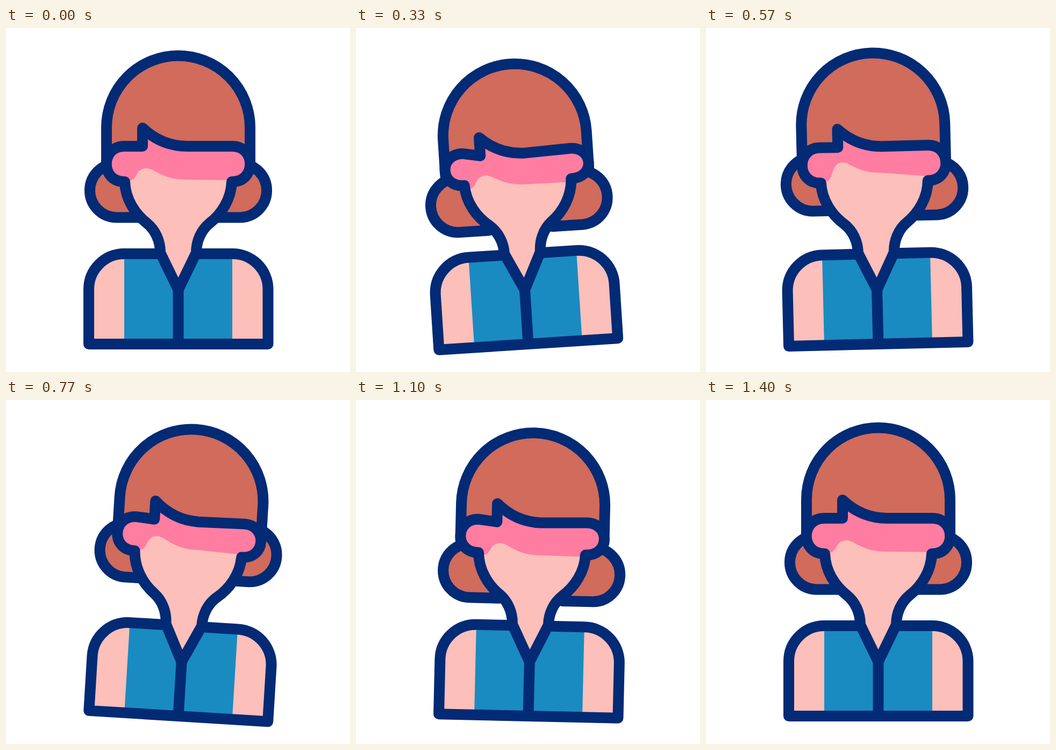
Animation, 640 px wide and 640 px high, one loop 2.17 s. Source, as an HTML page:

```html
<!DOCTYPE html>
<html lang="en">
<head>
<meta charset="utf-8">
<style>
  html, body { margin: 0; height: 100%; overflow: hidden; background: #fff; }
  svg { display: block; width: 100%; height: 100%; }
  .line { stroke: #032a75; stroke-width: 20; stroke-linecap: round; stroke-linejoin: round; }
  .none { fill: none; }
  .hair { fill: #d16b5b; }
  .skin { fill: #fcbfba; }
  .pink { fill: #ff7da1; }
  .blue { fill: #198bc1; }
</style>
</head>
<body>
<svg viewBox="0 0 640 640">
  <g id="person">
    <path id="bunLeft" class="line hair" d="M204 252A50.3 50.3 0 0 0 204 352.5H262"/>
    <path id="bunRight" class="line hair" d="M437 252A50.3 50.3 0 0 1 437 352.5H379"/>
    <path id="dome" class="line hair" d="M187 253V185A133.5 133.5 0 0 1 454 185V253"/>
    <path class="skin" d="M154 588V486A66 66 0 0 1 220 420H421A66 66 0 0 1 487.500 486V588Z"/>
    <path class="blue" d="M220 420H287L320.500 487L354 420H421V588H220Z"/>
    <path id="face" class="pink"/>
    <path id="skin" class="skin"/>
    <path id="outline" class="line none"/>
    <path class="line none" d="M287 420H220A66 66 0 0 0 154 486V588H487.500V486A66 66 0 0 0 421 420H354M320.500 487V588"/>
  </g>
</svg>
<script>
const LOOP = 2170, FPS = 30;
const el = id => document.getElementById(id);

// Tracks hold [frame, value] keys, joined with an ease in and out.
const tracks = {
  tilt:     [[0, 0], [12, -4], [25, 4], [38, 0]],
  dome:     [[0, 0], [9, 15], [19, -7.5], [28.5, 18], [38, 0]],
  fringe:   [[0, 0], [9, 13.3], [19, -1], [28.5, 15], [38, 0]],
  shade:    [[0, 0], [9, 9.7], [19, -15], [28.5, 12], [38, 0]],
  bunLeft:  [[0, 0], [9.5, 20], [20, -23], [32, 18], [42, 0]],
  bunRight: [[0, 0], [11.5, 21], [22, -22.5], [35, 23], [42, 0]]
};

function sample(keys, frame) {
  const i = keys.findIndex(key => key[0] > frame);
  if (i < 0) return keys[keys.length - 1][1];
  const [f0, v0] = keys[i - 1], [f1, v1] = keys[i];
  const u = (frame - f0) / (f1 - f0);
  return v0 + (v1 - v0) * u * u * (3 - 2 * u);
}

// From the right ear down to the collar point and up to the left ear.
const jaw = 'C419 318 401 346 379 363C363 376 354 396 354 418L320.500 487' +
            'L287 418C287 396 278 376 262 363C240 346 222 318 221 286';

function faceTop(h) {
  const left = 220 + h * 0.5, right = 220 + h * 0.75;
  return `M221 286C175.500 287 175.500 ${left} 220 ${left}L254 ${220 + h}V${186 + h}` +
         `C277 ${208 + h} 303 ${219.5 + h} 336 ${220 + h}L421 ${right}` +
         `C465.500 ${right} 465.500 287 420 286`;
}

function skinTop(w) {
  const left = Math.max(w, 0), right = w > 0 ? w : w * 0.4;
  return `M228 ${284 + left}C247 ${283 + left} 238 ${263 + w} 261 ${261 + w}` +
         `C277 ${261 + w} 289 ${282 + w} 335 ${282 + w}L420 ${283 + right}L420 286`;
}

function draw(now) {
  const frame = Math.floor((now % LOOP + 4) * FPS / 1000);
  const at = name => sample(tracks[name], frame);
  el('person').setAttribute('transform', `rotate(${at('tilt')} 320.5 588)`);
  for (const id of ['dome', 'bunLeft', 'bunRight'])
    el(id).setAttribute('transform', `translate(0 ${at(id)})`);
  const face = faceTop(at('fringe')) + jaw + 'Z';
  el('face').setAttribute('d', face);
  el('outline').setAttribute('d', face);
  el('skin').setAttribute('d', skinTop(at('shade')) + jaw + 'Z');
}

function tick() {
  draw(performance.now());
  requestAnimationFrame(tick);
}
tick();
</script>
</body>
</html>
```
